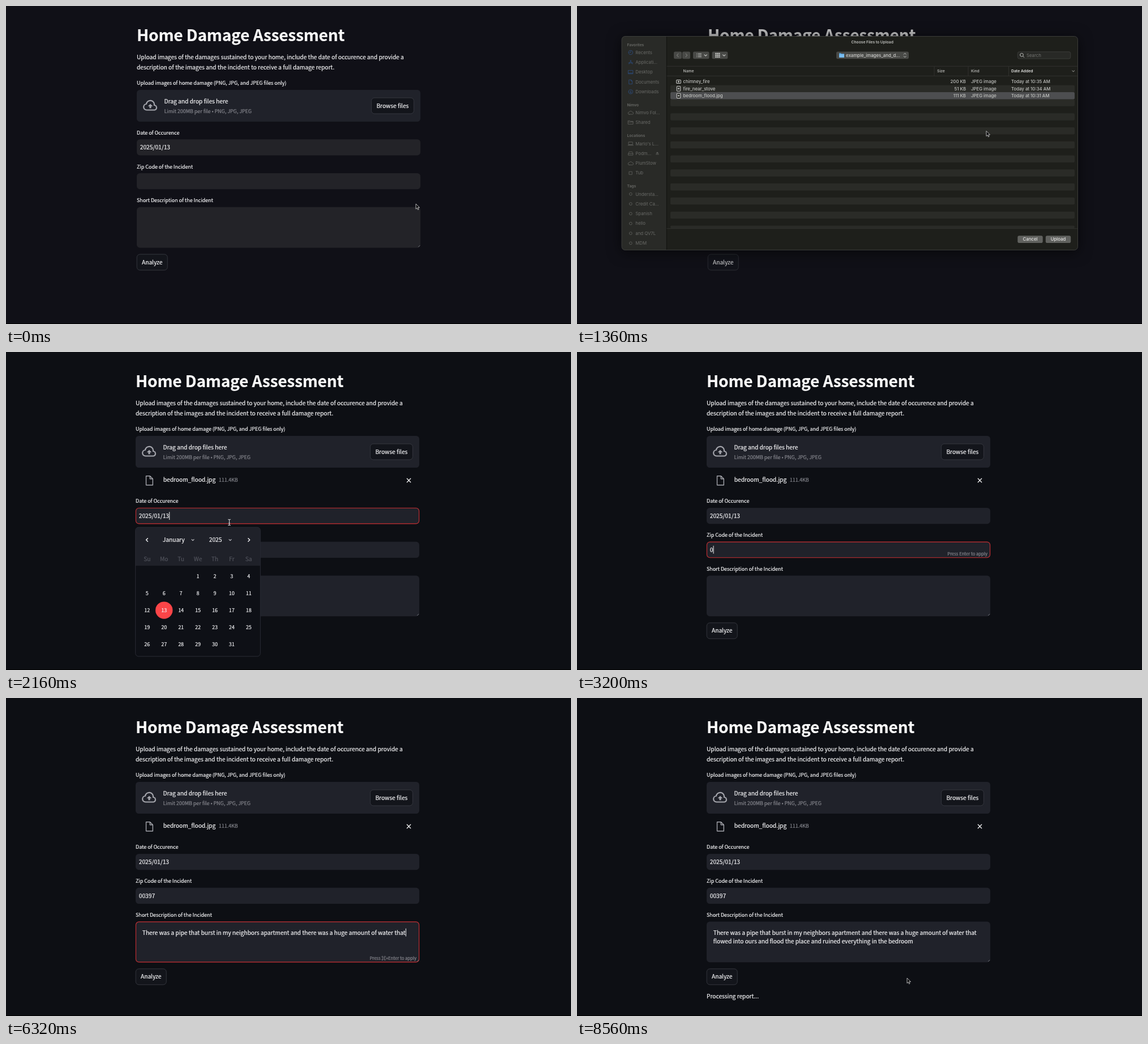
Animation, 998 px wide and 561 px high, one loop 8720 ms. Source, as an HTML page:

```html
<!DOCTYPE html>
<html lang="en">
<head>
<meta charset="utf-8">
<title>Home Damage Assessment</title>
<style>
  html, body { margin: 0; width: 100%; height: 100%; overflow: hidden; background: #101017; }
  svg { display: block; width: 998px; height: 561px; }
  text { white-space: pre; font-family: "Noto Sans CJK JP", "Noto Sans CJK SC", "Noto Sans CJK", sans-serif; stroke-width: .22px; }
  #dialog text { font-family: Inter, Roboto, sans-serif; stroke-width: 0; }
  #dialog { filter: drop-shadow(0 3px 12px rgba(0, 0, 0, .6)); }
  .line { fill: none; stroke-linecap: round; stroke-linejoin: round; }
</style>
</head>
<body>
<svg id="stage" width="998" height="561"></svg>
<script>
const LOOP = 8720, STEP = 80, SHIFT = 39.8;
const WHITE = '#f4f4f6', GREY = '#85868d', RED = '#ff4b4b';

// Markup helpers
const text = (x, y, s, size = 10.2, fill = WHITE, more = '') =>
  `<text x="${x}" y="${y}" font-size="${size}" fill="${fill}" stroke="${fill}" ${more}>${s}</text>`;
const rect = (x, y, w, h, r, fill, more = '') =>
  `<rect x="${x}" y="${y}" width="${w}" height="${h}" rx="${r}" fill="${fill}" ${more}/>`;
const line = (d, stroke, width = 1, more = '') =>
  `<path class="line" d="${d}" stroke="${stroke}" stroke-width="${width}" ${more}/>`;
const group = (id, body, more = '') => `<g id="${id}" ${more}>${body}</g>`;
const MID = 'text-anchor="middle"', END = 'text-anchor="end"';

const button = (id, x, y, w, label) => group(id,
  rect(x, y, w, 28, 5.5, '#13151b', 'stroke="#383a42" stroke-width=".9"') +
  text(x + w / 2, y + 17.6, label, 10.2, WHITE, MID));

const field = (id, y, h) =>
  rect(229, y, 501, h, 5.5, 'var(--field)') +
  rect(229.4, y + .3, 500.2, h - .6, 5.5, 'none', `id="${id}Focus" stroke="#c62f33" stroke-width="1.1"`);

const caret = (id, y) => rect(0, y, 1, 14, 0, WHITE, `id="${id}"`);

function calendar() {
  const colX = i => 249.3 + 29.9 * i;
  let out = rect(228.7, 309.3, 220.6, 227.7, 5.5, '#0e1016') +
    '<path d="M229 377v-62q0-5.5 5.5-5.5h209q5.5 0 5.5 5.5v62z" fill="#1f2129"/>' +
    rect(228.7, 309.3, 220.6, 227.7, 5.5, 'none', 'stroke="#2a2c35" stroke-width="1"') +
    text(276.8, 335.1, 'January') + text(358.8, 335.1, '2025') +
    line('M250.3 328.7l-2.8 2.8 2.8 2.8M427.8 328.7l2.8 2.8-2.8 2.8', WHITE, 1.4) +
    line('M328 330.6l2 2 2-2M394 330.6l2 2 2-2', '#c9c9ce', 1.1) +
    '<circle cx="279.2" cy="455.6" r="15.2" fill="#fb4548"/>';
  ['Su', 'Mo', 'Tu', 'We', 'Th', 'Fr', 'Sa'].forEach((d, i) => {
    out += text(colX(i), 368.7, d, 10.2, '#50525b', MID);
  });
  for (let day = 1; day <= 31; day++) {
    const cell = day + 2;
    out += text(colX(cell % 7), 398.9 + 29.9 * Math.floor(cell / 7), day, 8.92, WHITE, MID);
  }
  return out;
}

function page() {
  const upper =
    text(229, 61.6, 'Home Damage Assessment', 28, '#fafafa', 'font-weight="700" letter-spacing="-.15"') +
    text(229, 93.6, 'Upload images of the damages sustained to your home, include the date of occurence and provide a') +
    text(229, 111.5, 'description of the images and the incident to receive a full damage report.') +
    text(229, 139.2, 'Upload images of home damage (PNG, JPG, and JPEG files only)', 8.92) +
    rect(229, 148, 501, 56, 5.5, '#20222a') +
    '<g transform="translate(240 163) scale(1.08)">' +
    line('M19 19H6a5 5 0 0 1-.5-9.97A6.5 6.5 0 0 1 18.4 11.1 4 4 0 0 1 19 19z', '#a4a5ac', 2) +
    '<path d="M8 13h2.55v3h2.9v-3H16l-4-4z" fill="#a4a5ac"/></g>' +
    text(277.5, 172.1, 'Drag and drop files here') +
    text(277.5, 189.4, 'Limit 200MB per file • PNG, JPG, JPEG', 8.92, GREY) +
    button('browse', 643.4, 162, 75, 'Browse files');
  const file =
    line('M247.5 218.7h6.8l5 5v11h-11.8zM254.3 218.7v5h5', '#a4a5ac', 1.4) +
    text(277.7, 228.6, 'bedroom_flood.jpg') +
    text(375.8, 228.6, '111.4KB', 8.92, GREY) +
    line('M708.3 223.3l6.4 6.4M714.7 223.3l-6.4 6.4', WHITE, 1.3);
  const lower =
    text(229, 226.6, 'Date of Occurence', 8.92) + field('date', 235.2, 28.2) +
    text(234.8, 253.4, '2025/01/13') + caret('dateCaret', 242.3) +
    text(229, 286.5, 'Zip Code of the Incident', 8.92) + field('zip', 295, 28.2) +
    text(234.8, 313.2, '', 10.2, WHITE, 'id="zipText"') + caret('zipCaret', 302) +
    text(725, 319.2, 'Press Enter to apply', 7.65, GREY, `id="zipHint" ${END}`) +
    text(229, 346.4, 'Short Description of the Incident', 8.92) + field('desc', 354.8, 71.6) +
    line('M726.5 425l2.5-2.5', '#8a8b92', .8) +
    text(240.8, 377.8, '', 10.2, WHITE, 'id="line1"') +
    text(240.8, 393.7, '', 10.2, WHITE, 'id="line2"') + caret('descCaret', 366.8) +
    text(725, 422.7, 'Press ⌘+Enter to apply', 7.65, GREY, `id="descHint" ${END}`) +
    button('analyze', 229.2, 438, 54, 'Analyze') +
    text(229, 490.5, 'Processing report...', 10.2, WHITE, 'id="busy"');
  return upper + group('file', file) + group('lower', lower) + group('calendar', calendar());
}

const ICONS = {
  clock: 'M-3.7 0a3.7 3.7 0 1 0 7.4 0a3.7 3.7 0 1 0-7.4 0M0-2.2V0h-1.8',
  apps: 'M-3 3L.6-3.5M3 3L-.6-3.5M-3.8 1h7.6',
  desk: 'M-4-3h8v6h-8zM-4 1.6h8',
  doc: 'M-2.7-3.7h3.4l2 2v5.4h-5.4zM.7-3.7v2h2',
  down: 'M-3.7 0a3.7 3.7 0 1 0 7.4 0a3.7 3.7 0 1 0-7.4 0M0-2v3.8M-1.5.5L0 2 1.5.5',
  sky: 'M-2.6 3h5.4a2 2 0 0 0 0-4A3 3 0 0 0-2.6-1a2 2 0 0 0 0 4z',
  folder: 'M-4.3-3h3l1 1h4.6v5h-8.6zM-4.3-.7h8.6',
  laptop: 'M-3.4-2.8h6.8v4.6h-6.8zM-4.6 3h9.2',
  disk: 'M-4 .5l1.3-3.3h5.4L4 .5v2.6h-8zM-4 .5h8',
  square: 'M-2.5-2.5h5v5h-5z',
  tag: 'M-2.4 0a2.4 2.4 0 1 0 4.8 0a2.4 2.4 0 1 0-4.8 0'
};
const SIDEBAR = [
  ['Favorites', 68.3, 82, '#2c4a78', ['Recents', 'clock'], ['Applicati...', 'apps'], ['Desktop', 'desk'], ['Documents', 'doc'], ['Downloads', 'down']],
  ['Nimvo', 174.4, 188.1, '#5c5d5a', ['Nimvo Fol...', 'sky'], ['Shared', 'folder']],
  ['Locations', 229, 242.7, '#5c5d5a', ["Marlo's L...", 'laptop'], ['Podm...', 'disk'], ['PlumStow', 'sky'], ['Tub', 'square']],
  ['Tags', 318, 331.7, '#5c5d5a', ['Understa...', 'tag'], ['Credit Ca...', 'tag'], ['Spanish', 'tag'], ['hello', 'tag'], ['and QV7L', 'tag'], ['MDM', 'tag']]
];
const FILES = [
  ['chimney_fire', '200 KB', '10:35 AM'],
  ['fire_near_stove', '51 KB', '10:34 AM'],
  ['bedroom_flood.jpg', '111 KB', '10:31 AM']
];

function dialog() {
  const INK = '#c3c4c1', DIM = '#696a67', RULE = '#363733', KEY = '#484946';
  const bold = 'font-weight="600"', med = 'font-weight="500"';
  let out = rect(79, 53.5, 805.5, 377, 6, '#1e1f1b') +
    '<path d="M158 53.5h-73q-6 0-6 6v365q0 6 6 6h73z" fill="#292a27"/>' +
    line('M158.4 54v376', '#11120f', .9) +
    text(521.7, 66, 'Choose Files to Upload', 6.7, INK, `${bold} ${MID}`);

  for (const [head, headY, top, tint, ...items] of SIDEBAR) {
    out += text(88.5, headY + 2.4, head, 6.7, DIM, bold);
    items.forEach(([label, icon], i) => {
      const y = top + 17.33 * i;
      out += line(ICONS[icon], tint, .9, `transform="translate(94.8 ${y})"`) +
        text(103.3, y + 2.8, label, 7.8, DIM);
    });
  }
  out += '<path d="M139.2 260.3l2.7-3 2.7 3zM139.2 261.3h5.4v1h-5.4z" fill="#5c5d5a"/>';

  out += rect(171, 80.6, 14, 12.6, 2.5, KEY) + rect(186, 80.6, 14, 12.6, 2.5, KEY) +
    rect(205, 80.6, 28.5, 12.6, 2.5, KEY) + rect(238.5, 80.6, 27.8, 12.6, 2.5, KEY) +
    line('M179 84.2l-2.6 2.7 2.6 2.7M192 84.2l2.6 2.7-2.6 2.7', '#777875', 1.1) +
    line('M211.5 84.2h.3M214 84.2h5.5M211.5 86.9h.3M214 86.9h5.5M211.5 89.6h.3M214 89.6h5.5', INK, 1) +
    line('M225 86l2.2 2.2 2.2-2.2M257.6 86l2.2 2.2 2.2-2.2', INK, 1.1);
  for (let i = 0; i < 9; i++)
    out += rect(244.2 + i % 3 * 3, 82.7 + Math.floor(i / 3) * 3, 2.3, 2.3, .3, INK);
  out += rect(458, 80.6, 128, 12.6, 2.8, KEY) +
    '<path d="M463 83.2h3l1 1h5v6.6h-9z" fill="#5aa5e0"/>' + rect(463, 85.3, 9, 5.5, .6, '#79bdf0') +
    text(475, 89.7, 'example_images_and_d...', 7.8, '#d0d0ce', med) +
    line('M577.2 85.3l2-2 2 2M577.2 88.5l2 2 2-2', INK, 1) +
    rect(778.3, 80.8, 93.5, 12.2, 2.8, '#282926', 'stroke="#41423f" stroke-width=".8"') +
    line('M782.6 86.3a2.9 2.9 0 1 0 5.8 0a2.9 2.9 0 1 0-5.8 0M787.7 88.5l2 2', INK, 1) +
    text(794, 89.8, 'Search', 7.8, '#737471');

  out += line('M159 106.3h725M159 123.4h725M159 392.6h725', RULE, .8) +
    line('M631 107v16M691 107v16M762.5 107v16', RULE, .8) +
    text(187.5, 117.4, 'Name', 6.8, INK, med) + text(636, 117.4, 'Size', 6.8, INK, med) +
    text(696, 117.4, 'Kind', 6.8, INK, med) + text(767, 117.4, 'Date Added', 6.8, '#e2e2e0', bold) +
    line('M874.8 114l1.9 1.9 1.9-1.9', INK, .9);

  for (let i = 0; i < 11; i++)
    out += rect(165, 139.7 + 24.77 * i, 714, i < 10 ? 12.4 : 4.6, 2, '#2a2b27');
  out += rect(165, 152.1, 714, 12.4, 2, '#4d4e50', 'id="picked"');
  FILES.forEach(([name, size, when], i) => {
    const y = 133.5 + 12.4 * i, w = i ? 6.4 : 7.6, h = i ? 8.4 : 6;
    out += rect(179.5 - w / 2, y - h / 2, w, h, .5, '#20211e', 'stroke="#d8d8d5" stroke-width="1"') +
      rect(178, y - 1.6, 3, 3, .3, '#a2a3a0') +
      text(187.5, y + 2.8, name, 7.8, INK, med) +
      text(687, y + 2.8, size, 7.8, INK, `${med} ${END}`) +
      text(696, y + 2.8, 'JPEG image', 7.8, INK, med) +
      text(767, y + 2.8, 'Today at ' + when, 7.8, INK, med);
  });

  const key = (id, x, label) => group(id, rect(x, 405.2, 44.4, 12.8, 2.8, '#60615e') +
    text(x + 22.2, 414.4, label, 7.8, '#e6e6e4', `${med} ${MID}`));
  return out + key('cancel', 778.3, 'Cancel') + key('upload', 827.8, 'Upload') +
    rect(79, 53.5, 805.5, 377, 6, 'none', 'stroke="#454643" stroke-width=".8"');
}

const pointers =
  '<path id="arrow" d="M0 0v9.2l2.1-2 1.4 3.2 1.5-.7-1.4-3.1h2.9z" fill="#08080a" stroke="#dcdcdc" stroke-width=".8"/>' +
  '<path id="hand" d="M-.8.8q.8-1.4 1.6 0v3l2.7.6q.9.3.8 1.3l-.5 2.6q-.2.7-1 .7h-3q-.6 0-1-.5l-2.2-2.8q-.4-1 .8-.9l1.8.9z" fill="#f2f2f2" stroke="#222" stroke-width=".5"/>' +
  line('M-2-5.2q2 0 2 1.3 0-1.3 2-1.3M0-4V4M-2 5.2q2 0 2-1.3 0 1.3 2 1.3M-1.3 1.5h2.6', '#d0d0d3', 1.1, 'id="beam"');

const stage = document.getElementById('stage');
stage.innerHTML = rect(0, 0, 998, 561, 0, '#101017', 'id="back"') +
  group('page', page()) + group('dialog', dialog()) + group('pointer', pointers) +
  rect(0, 560, 998, 1, 0, '#000');

const $ = Object.fromEntries([...stage.querySelectorAll('[id]')].map(el => [el.id, el]));
const show = (el, on) => { el.style.display = on ? '' : 'none'; };

// Timeline tables: time, then values
const POINTER = [
  [0, 724, 349, 'arrow'], [240, 724, 349, 'arrow'], [480, 683.7, 180, 'hand'],
  [1120, 683.7, 180, 'arrow'], [1280, 680, 157, 'arrow'], [1600, 852, 411, 'arrow'],
  [1760, 862, 420, 'arrow'], [1840, 883, 428, 'arrow'], [1920, 640, 330, 'arrow'],
  [2000, 420, 302, 'beam'], [2160, 394.5, 300.5, 'beam'], [2320, 394.5, 300.5, 'arrow'],
  [2480, 279, 452, 'hand'], [2560, 279, 452, 'arrow'], [2800, 360, 349, 'beam'],
  [3120, 360, 349, ''], [4080, 360, 352, 'beam'], [4320, 411, 418, 'beam'],
  [4720, 411, 418, ''], [7760, 411, 418, 'arrow'], [7920, 258, 490, 'hand'],
  [8080, 258, 490, 'arrow'], [8240, 583, 494, 'arrow']
];
const TYPED = [[4720, 0], [5760, 44], [5840, 58], [6000, 58], [6320, 95], [6800, 122], [7680, 169]];
const ZIP_TYPED = [[3120, 0], [3520, 5]];
const DIALOG = [[560, 0], [640, .5], [800, 1], [1600, 1], [1680, .85], [1760, .55], [1840, .15], [1920, 0]];

const ZIP = '00397';
const LINE1 = 'There was a pipe that burst in my neighbors apartment and there was a huge amount of water that';
const LINE2 = 'flowed into ours and flood the place and ruined everything in the bedroom';

function at(table, t, col = 1) {
  const i = table.findIndex(row => row[0] > t);
  if (i === 0) return table[0][col];
  if (i < 0) return table[table.length - 1][col];
  const a = table[i - 1], b = table[i];
  return a[col] + (b[col] - a[col]) * (t - a[0]) / (b[0] - a[0]);
}

function hot(el, on) {
  const [frame, label] = el.children;
  frame.setAttribute('stroke', on ? RED : '#383a42');
  label.setAttribute('fill', on ? RED : WHITE);
  label.setAttribute('stroke', on ? RED : WHITE);
}

function render(t) {
  const within = (a, b) => t >= a && t < b;
  const filed = t >= 1920, early = t < 2080;
  const fade = at(DIALOG, t);

  $.back.setAttribute('fill', early ? '#101017' : '#0d0f14');
  stage.style.setProperty('--field', early ? '#232328' : '#20222a');
  $.page.setAttribute('transform', `translate(${early ? 2 : 0} 0)`);
  $.page.style.opacity = fade > 0 ? .76 : 1;
  $.lower.setAttribute('transform', `translate(0 ${filed ? SHIFT : 0})`);
  show($.file, filed);
  hot($.browse, within(400, 1920));
  hot($.analyze, within(7920, 8160));

  show($.dialog, fade > 0);
  $.dialog.style.opacity = fade;
  $.dialog.setAttribute('transform', `translate(0 ${t < 800 ? -5 * (1 - fade) : -6.8 * (1 - fade)})`);
  show($.picked, t >= 1280);
  $.upload.style.opacity = t >= 1280 ? 1 : .45;

  const onDate = within(2080, 2560), onZip = within(2800, 4320), onDesc = within(4320, 7760);
  show($.dateFocus, onDate);
  show($.calendar, onDate);
  show($.dateCaret, onDate);
  $.dateCaret.setAttribute('x', 288.2);

  const digits = Math.floor(at(ZIP_TYPED, t));
  $.zipText.textContent = ZIP.slice(0, digits);
  show($.zipFocus, onZip);
  show($.zipHint, onZip && digits > 0);
  show($.zipCaret, onZip && !within(3760, 3920));
  $.zipCaret.setAttribute('x', 234.9 + $.zipText.getComputedTextLength());

  const n = Math.round(at(TYPED, t)), second = n > LINE1.length;
  $.line1.textContent = LINE1.slice(0, n);
  $.line2.textContent = second ? LINE2.slice(0, n - LINE1.length - 1) : '';
  show($.descFocus, onDesc);
  show($.descHint, onDesc && n > 0);
  show($.descCaret, onDesc && n > 0);
  $.descCaret.setAttribute('x', 240.9 + (second ? $.line2 : $.line1).getComputedTextLength());
  $.descCaret.setAttribute('y', second ? 382.7 : 366.8);
  show($.busy, t >= 8080);

  const kind = POINTER.filter(row => row[0] <= t).pop()[3];
  for (const id of ['arrow', 'hand', 'beam']) show($[id], id === kind);
  $.pointer.setAttribute('transform', `translate(${at(POINTER, t, 1)} ${at(POINTER, t, 2)})`);
}

const start = performance.now();
function tick() {
  const t = (performance.now() - start) % LOOP;
  render(Math.floor(t / STEP) * STEP);
  requestAnimationFrame(tick);
}
tick();
</script>
</body>
</html>
```
